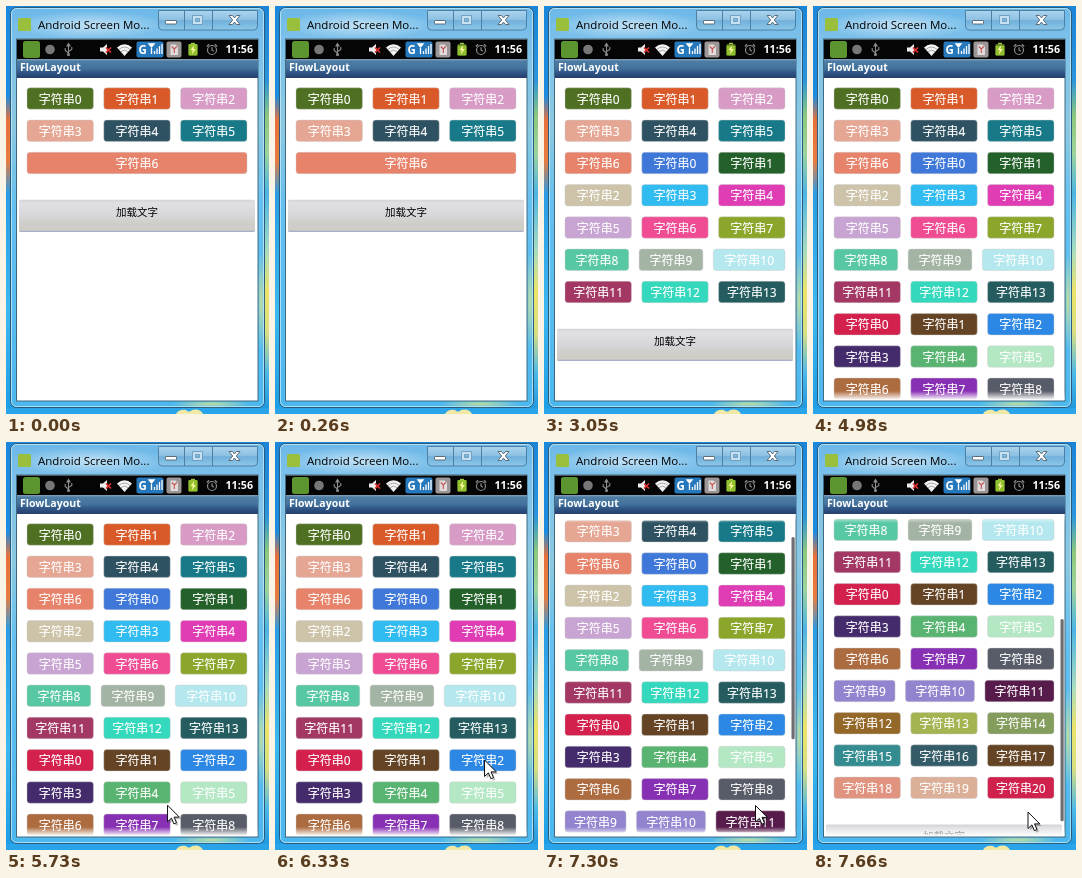
Recreate the animation shown at these times as an HTML page. Size 263 by 408 pixels, loop 8 s.

```html
<!DOCTYPE html>
<html lang="zh">
<head>
<meta charset="utf-8">
<title>FlowLayout</title>
<style>
  html, body { margin: 0; width: 100%; height: 100%; overflow: hidden; background: #2b93d0; }
  svg { display: block; width: 263px; height: 408px; }
  text { font-family: "Noto Sans", "Open Sans", "Noto Sans CJK SC", "Noto Sans CJK", sans-serif; }
  .tag text { font-size: 12px; font-weight: 500; fill: #fff; stroke: #fff; stroke-width: .15; text-anchor: middle; }
  .tag rect { stroke: #c8c8c8; stroke-opacity: .5; stroke-width: .8; }
</style>
</head>
<body>
<svg viewBox="0 0 263 408" xmlns="http://www.w3.org/2000/svg">
  <defs>
    <linearGradient id="wallLeft" x2="0" y2="1">
      <stop offset="0" stop-color="#1c88dc"/>
      <stop offset=".22" stop-color="#1c8ce0"/>
      <stop offset=".28" stop-color="#e8703a"/>
      <stop offset=".38" stop-color="#e87c40"/>
      <stop offset=".46" stop-color="#2a9ce4"/>
      <stop offset=".75" stop-color="#3cb8f0"/>
      <stop offset="1" stop-color="#1c9ce4"/>
    </linearGradient>
    <linearGradient id="wallRight" x2="0" y2="1">
      <stop offset="0" stop-color="#1a84d8"/>
      <stop offset=".18" stop-color="#2a94dc"/>
      <stop offset=".27" stop-color="#8cc87c"/>
      <stop offset=".36" stop-color="#9cd49c"/>
      <stop offset=".46" stop-color="#4cb4e4"/>
      <stop offset=".6" stop-color="#a8dcc0"/>
      <stop offset=".7" stop-color="#ece468"/>
      <stop offset=".8" stop-color="#d8e080"/>
      <stop offset=".9" stop-color="#4cb8e8"/>
      <stop offset="1" stop-color="#1a94dc"/>
    </linearGradient>
    <linearGradient id="glass" x2="0" y2="1">
      <stop offset="0" stop-color="#6cb8e8"/>
      <stop offset=".08" stop-color="#7cc0ea"/>
      <stop offset=".3" stop-color="#8cc8e0"/>
      <stop offset=".5" stop-color="#64c0f0"/>
      <stop offset="1" stop-color="#4cb8ee"/>
    </linearGradient>
    <linearGradient id="bar" x2="0" y2="1">
      <stop offset="0" stop-color="#86a2ba"/>
      <stop offset=".12" stop-color="#4d7ca4"/>
      <stop offset=".5" stop-color="#42719c"/>
      <stop offset=".72" stop-color="#2f5585"/>
      <stop offset="1" stop-color="#263f6e"/>
    </linearGradient>
    <linearGradient id="push" x2="0" y2="1">
      <stop offset="0" stop-color="#d4d4d8"/>
      <stop offset=".1" stop-color="#e0e0e4"/>
      <stop offset=".45" stop-color="#d8d8dc"/>
      <stop offset=".75" stop-color="#cfcdc8"/>
      <stop offset=".93" stop-color="#cecdc6"/>
      <stop offset="1" stop-color="#b4b8cc"/>
    </linearGradient>
    <linearGradient id="ctl" x2="0" y2="1">
      <stop offset="0" stop-color="#acd4ee"/>
      <stop offset=".48" stop-color="#8cc0e2"/>
      <stop offset=".52" stop-color="#72b0da"/>
      <stop offset="1" stop-color="#8cc8ea"/>
    </linearGradient>
    <linearGradient id="fadeUp" x2="0" y2="1">
      <stop offset="0" stop-color="#fff"/>
      <stop offset="1" stop-color="#fff" stop-opacity="0"/>
    </linearGradient>
    <linearGradient id="fadeDown" x2="0" y2="1">
      <stop offset="0" stop-color="#fff" stop-opacity="0"/>
      <stop offset="1" stop-color="#fff"/>
    </linearGradient>
    <radialGradient id="glow">
      <stop offset="0" stop-color="#fff" stop-opacity=".55"/>
      <stop offset="1" stop-color="#fff" stop-opacity="0"/>
    </radialGradient>
    <radialGradient id="petal">
      <stop offset="0" stop-color="#dce88c" stop-opacity=".8"/>
      <stop offset="1" stop-color="#dce88c" stop-opacity="0"/>
    </radialGradient>
    <clipPath id="view"><rect x="11" y="72" width="240.5" height="322"/></clipPath>
  </defs>

  <!-- desktop and window frame -->
  <rect width="132" height="408" fill="url(#wallLeft)"/>
  <rect x="131" width="132" height="408" fill="url(#wallRight)"/>
  <rect y="402" width="263" height="6" fill="#2aa4e8"/>
  <path d="M170 408q3-5 10-4q3 3 6 0q8-2 11 4z" fill="#f0e8a4"/>
  <rect x="4.5" y="1.5" width="254" height="400" rx="6" fill="url(#glass)" stroke="#2a5a7c"/>
  <ellipse cx="205" cy="398" rx="40" ry="4" fill="url(#petal)"/>
  <ellipse cx="255" cy="295" rx="4" ry="50" fill="url(#petal)"/>
  <rect x="5.5" y="2.5" width="252" height="398" rx="5" fill="none" stroke="#c4ecfc" stroke-opacity=".75"/>
  <ellipse cx="84" cy="19" rx="78" ry="14" fill="url(#glow)"/>
  <rect x="12" y="12" width="13" height="13" rx="1.5" fill="#9abf3c"/>
  <text x="32" y="23" font-size="11.5" fill="#000" style="font-family:'Open Sans','Noto Sans',sans-serif">Android Screen Mo...</text>
  <path d="M152.500 4.500H251.500V20q0 4-4 4H156.500q-4 0-4-4z" fill="url(#ctl)" stroke="#4c80a4"/>
  <path d="M178.500 5V24M206.500 5V24" stroke="#4c80a4"/>
  <g fill="#fff" stroke="#52636f" stroke-width=".9">
    <rect x="159.500" y="14.500" width="11" height="3.500" rx=".6"/>
    <path d="M186.500 9.500h10v9h-10zM189.500 12.500h4v3h-4z" fill="#c4e0f2" fill-rule="evenodd" stroke="#6c9cbc"/>
    <path d="M223 9.500h3.500l2 2.500 2-2.500h3.500l-3.700 4.500 3.700 4.500h-3.500l-2-2.500-2 2.500H223l3.700-4.500z"/>
  </g>
  <rect x="10.500" y="33" width="241.500" height="362" fill="#fff" stroke="#3f6a82"/>

  <!-- status bar -->
  <rect x="11" y="33.500" width="241" height="19.500" fill="#050505"/>
  <rect x="17" y="35" width="17" height="17" rx="2.500" fill="#5c9430"/>
  <circle cx="44" cy="43.500" r="4.800" fill="#777"/>
  <g fill="none" stroke="#8b8b8b" stroke-width="1.100">
    <path d="M62.500 39V49M62.500 47l-3.300-2.500V42M62.500 45.500l3.300-2V41"/>
    <path d="M61 40l1.500-2.500L64 40z" fill="#8b8b8b"/>
    <circle cx="62.500" cy="48.500" r="1" fill="#8b8b8b"/>
  </g>
  <path d="M94 41.500h3l4-3.500v11l-4-3.500h-3z" fill="#eee"/>
  <path d="M100 41.500l5 5m0-5l-5 5" stroke="#e0302c" stroke-width="1.700"/>
  <path d="M111 41.500q7.500-6.500 15 0L118.500 50z" fill="#f4f4f4"/>
  <path d="M113 43.300q5.500-4.500 11 0M115 45.600q3.500-3 7 0" fill="none" stroke="#777" stroke-width=".6"/>
  <rect x="130.500" y="35.500" width="27" height="16" rx="2" fill="#2678bd"/>
  <text x="132.500" y="48" font-size="11.500" font-weight="700" fill="#fff">G</text>
  <path d="M143 38h5l-2.500 3zM145.500 40v8M148.500 48v-3M151 48v-5.500M153.500 48v-8M156 48v-10" fill="#fff" stroke="#fff" stroke-width="1.300"/>
  <rect x="160.500" y="35.500" width="15" height="16" rx="2" fill="#9c9696"/>
  <path d="M164.500 38.500h5l2.500 2.500v8h-7.500z" fill="#e0dcdc"/>
  <path d="M165.800 40.500l2.500 2.500 2.500-2.500M168.300 43v4" fill="none" stroke="#c45050" stroke-width="1.100"/>
  <rect x="182.500" y="38" width="9" height="11.500" rx="1" fill="#4e6a24"/>
  <rect x="185" y="36.800" width="4" height="1.500" fill="#9fc545"/>
  <rect id="charge" x="182.500" width="9" rx="1" fill="#92c02e"/>
  <path d="M188.300 39l-3.800 5h2.300l-1 4.500 4-5.500h-2.400z" fill="#fff7a0"/>
  <g fill="none" stroke="#8c8c8c" stroke-width="1.200">
    <circle cx="206" cy="44" r="4.500"/>
    <path d="M206 41.300V44l1.800 1.300M200.800 40.500l2.300-2.200M211.200 40.500l-2.300-2.200"/>
  </g>
  <text x="219.500" y="47.200" font-size="10.700" font-weight="700" fill="#fff">11:56</text>

  <rect x="11" y="53" width="241" height="19" fill="url(#bar)"/>
  <text x="14" y="65.300" font-size="10.550" font-weight="700" fill="#fff">FlowLayout</text>

  <g clip-path="url(#view)">
    <g id="page"></g>
    <rect id="top" x="11" y="72" width="241" height="9" fill="url(#fadeUp)"/>
    <rect id="bottom" x="11" y="385" width="241" height="9" fill="url(#fadeDown)"/>
    <rect id="thumb" x="247.500" width="3.200" rx="1.500" fill="#6e6e72"/>
  </g>
  <g id="cursor">
    <path d="M2 2V18.500L5.900 14.900L8.400 20.700L11 19.500L8.500 13.900H13.800z" fill="#000" opacity=".25"/>
    <path d="M0 0V16.500L3.900 12.900L6.400 18.700L9 17.500L6.500 11.900H11.800z" fill="#fff" stroke="#111"/>
  </g>
</svg>
<script>
const LOOP = 8000, TOP = 72, VIEW = 322;
const LEFT = 21, WIDTH = 220, GAP = 10.4, ROW = 32.25, FIRST = 81.8, TAG_H = 21.4;
const FLING = { start: 7254, end: 7660, distance: 166 };
const $ = id => document.getElementById(id);

// Each click of the button appends one batch.
const batches = [
  "4f7022 d95a28 d79bc6 e6a694 2f5262 187a88 e8836b",
  "3f78d8 24602a ccc3a9 30bcf0 e03cb4 c8a4d2 f04c94 8ca62c 58c8a4 a4b4a4 b4e8ee a43864 34d8bc 245c60",
  "d4204c 644424 2c88e4 442c6c 58b470 b4e8c4 ac6c40 8830b4 585c68 9484d0 9484d0 581c4c 946828 a4b450 " +
  "849c5c 348c90 345c68 644424 e09480 dcb098 d0204c"
].map(s => s.split(" ").map((color, n) => ({ color: "#" + color, n })));

const cursorPath = [
  [4980, 182, 409], [5530, 158, 365], [5670, 158, 365], [6090, 222, 333],
  [6330, 209.5, 318], [7000, 209.5, 318], [7300, 211.5, 363.5], [7660, 215, 370]
];

const clamp = v => Math.max(0, Math.min(1, v));

function along(path, t) {
  const next = path.findIndex(p => p[0] >= t);
  if (next < 0) return path[path.length - 1].slice(1);
  const b = path[next], a = path[Math.max(0, next - 1)];
  const k = clamp((t - a[0]) / (b[0] - a[0] || 1));
  const ease = k * k * (3 - 2 * k);
  return a.slice(1).map((v, j) => v + (b[j + 1] - v) * ease);
}

// A fling slows down evenly until it rests.
function scrollAt(t) {
  const left = 1 - clamp((t - FLING.start) / (FLING.end - FLING.start));
  return FLING.distance * (1 - left * left);
}

function tag({ color, n }, x, y, w) {
  return `<g class="tag"><rect x="${x}" y="${y}" width="${w}" height="${TAG_H}" rx="3" fill="${color}"/>` +
    `<text x="${x + w / 2}" y="${y + 15.8}">字符串${n}</text></g>`;
}

// Tags in a row share the spare width equally; two digits need 8px more.
function layout(count) {
  const tags = batches.slice(0, count).flat();
  let html = "", y = FIRST;
  for (let i = 0; i < tags.length; i += 3, y += ROW) {
    const row = tags.slice(i, i + 3);
    const extra = row.map(t => t.n > 9 ? 8 : 0);
    const spare = WIDTH - GAP * (row.length - 1) - extra.reduce((a, b) => a + b);
    let x = LEFT;
    row.forEach((t, j) => {
      const w = spare / row.length + extra[j];
      html += tag(t, x, y, w);
      x += w + GAP;
    });
  }
  const by = y + 15.3;
  html += `<rect x="13" y="${by}" width="236" height="32" rx="1.5" fill="url(#push)"/>` +
    `<path d="M13.5 ${by + 31.6}H248.5" stroke="#a0a8c4" stroke-width=".8"/>` +
    `<text x="131" y="${by + 15.8}" font-size="10.5" font-weight="500" text-anchor="middle" fill="#000">加载文字</text>`;
  $("page").innerHTML = html;
  return by + 36 - TOP;
}

let shown = 0, height = 0;

function draw(t) {
  const count = t < 2590 ? 1 : t < 4980 ? 2 : 3;
  if (count !== shown) {
    height = layout(count);
    shown = count;
  }

  const origin = t < 5730 ? 4980 : t < 7060 ? 5730 : 7060;
  const step = t < origin ? t : origin + Math.floor((t - origin) / 60) * 60;
  const offset = scrollAt(step);
  const [cx, cy] = along(cursorPath, step);
  $("page").setAttribute("transform", `translate(0 ${-offset})`);
  $("cursor").setAttribute("transform", `translate(${cx} ${cy})`);

  const below = Math.max(0, height - VIEW - offset);
  $("top").setAttribute("opacity", clamp(offset / 9));
  $("bottom").setAttribute("opacity", clamp(below / 9));
  const ratio = VIEW / height;
  $("thumb").setAttribute("y", TOP + 0.8 + offset * ratio);
  $("thumb").setAttribute("height", VIEW * Math.min(1, ratio));
  $("thumb").setAttribute("opacity", offset > 0 ? 1 : 0);

  const low = (t >= 260 && t < 2190) || (t >= 3050 && t < 5100);
  $("charge").setAttribute("y", low ? 39.5 : 38);
  $("charge").setAttribute("height", low ? 10 : 11.5);
}

const start = performance.now();
function frame() {
  draw((performance.now() - start) % LOOP);
  requestAnimationFrame(frame);
}
frame();
</script>
</body>
</html>
```
